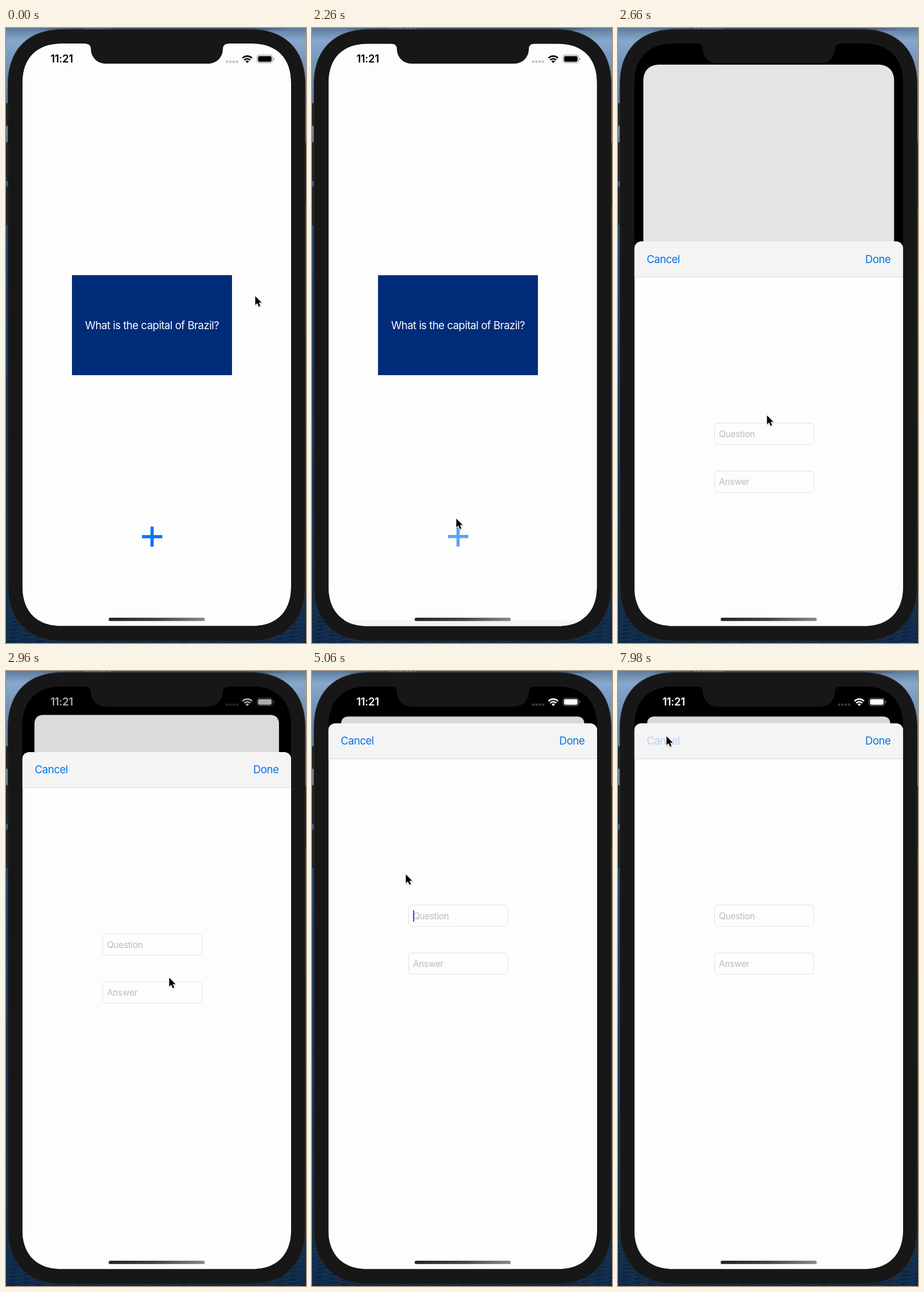
These frames come from a looping animation (523x1070 px, 8000 ms). An HTML page:

```html
<!DOCTYPE html>
<html lang="en">
<head>
<meta charset="utf-8">
<title>Flashcards</title>
<style>
  html, body { margin: 0; width: 100%; height: 100%; overflow: hidden; background: #171717; }
  svg { display: block; width: 100%; height: 100%; }
  text { font: 400 18.6px Inter, Roboto, sans-serif; letter-spacing: -.028em; }
  .clock { font-weight: 600; letter-spacing: -.02em; }
  .hint { font-size: 15.4px; letter-spacing: -.02em; fill: #bcbcc0; }
  .link { fill: #0073ea; }
  .label { font-size: 12px; letter-spacing: 0; }
</style>
</head>
<body>
<svg viewBox="0 0 523 1070" preserveAspectRatio="none">
  <defs>
    <linearGradient id="desk" x2="0" y2="1">
      <stop offset="0" stop-color="#5f7b9c"/>
      <stop offset=".02" stop-color="#86a8cc"/>
      <stop offset=".11" stop-color="#5d7c9f"/>
      <stop offset=".17" stop-color="#74838f"/>
      <stop offset=".25" stop-color="#3a6088"/>
      <stop offset=".34" stop-color="#1c4468"/>
      <stop offset="1" stop-color="#0c2542"/>
    </linearGradient>
    <linearGradient id="topEdge">
      <stop offset=".1" stop-color="#3d4b60" stop-opacity="0"/>
      <stop offset=".25" stop-color="#3d4b60"/>
      <stop offset=".8" stop-color="#3d4b60"/>
      <stop offset=".95" stop-color="#3d4b60" stop-opacity="0"/>
    </linearGradient>
    <linearGradient id="bar">
      <stop offset="0" stop-color="#232323"/>
      <stop offset=".5" stop-color="#444"/>
      <stop offset="1" stop-color="#8a8a8a"/>
    </linearGradient>
    <pattern id="waves" width="23" height="7" patternUnits="userSpaceOnUse" patternTransform="rotate(8)">
      <path d="M0 2q6-2 12 0t11 0M3 5q5 2 13 0" fill="none" stroke="#3f6f9c" stroke-opacity=".35"/>
    </pattern>
    <clipPath id="screenClip"><path id="screenShape"/></clipPath>
  </defs>

  <rect width="523" height="1070" fill="url(#desk)"/>
  <rect y="360" width="523" height="710" fill="url(#waves)"/>
  <rect width="523" height="4" fill="url(#topEdge)"/>
  <text class="label" x="158" y="3" text-anchor="middle" fill="#8995a5">Receipts</text>

  <g fill="#20221f" stroke="#38393a" stroke-width=".7">
    <rect x="-3" y="131" width="8" height="39"/>
    <rect x="-3" y="199" width="8" height="67"/>
    <rect x="-3" y="276" width="8" height="67"/>
    <rect x="519" y="200" width="7" height="110"/>
  </g>
  <path id="body" fill="#171717" stroke="#2d2e2e"/>

  <g clip-path="url(#screenClip)">
    <rect x="28" y="26" width="470" height="1016"/>
    <g id="home">
      <path id="homeShape" fill="#fdfdfc"/>
      <rect x="115" y="430" width="279" height="174" fill="#002c7a"/>
      <text x="254.5" y="524" text-anchor="middle" fill="#fff">What is the capital of Brazil?</text>
      <path id="plus" d="M254.7 867.5V902.5M237 885H272.5" stroke="#0a72ff" stroke-width="5.6"/>
      <path id="dim"/>
    </g>
    <g id="sheet">
      <rect x="28.5" width="468.5" height="1100" rx="12" fill="#fdfdfc"/>
      <path d="M28.5 61V12a12 12 0 0 1 12-12H485a12 12 0 0 1 12 12V61z" fill="#f4f4f5"/>
      <path d="M28.5 61.5H497" stroke="#d6d6d9"/>
      <text id="cancel" class="link" x="50" y="37">Cancel</text>
      <text class="link" x="475.3" y="37" text-anchor="end">Done</text>
      <g fill="#fdfdfd" stroke="#e2e2e6">
        <rect x="168.5" y="316" width="173" height="37" rx="5.5"/>
        <rect x="168.5" y="399.4" width="173" height="37" rx="5.5"/>
      </g>
      <text class="hint" x="176" y="340.4">Question</text>
      <text class="hint" x="176" y="423.8">Answer</text>
      <rect id="caret" x="176" y="325" width="2.3" height="20" rx="1" fill="#3d5fe0"/>
    </g>
    <g id="status">
      <text class="clock" x="97" y="60.4" text-anchor="middle">11:21</text>
      <g id="dots" opacity=".23"></g>
      <g fill="none" stroke="currentColor" stroke-width="2.7">
        <path d="M412.3 52.4a11.7 11.7 0 0 1 16.6 0"/>
        <path d="M415.4 55.7a7.2 7.2 0 0 1 10.4 0"/>
      </g>
      <path d="M420.6 61l-3-3a4.3 4.3 0 0 1 6 0z"/>
      <rect x="437.7" y="47.4" width="27" height="13" rx="3.8" fill="none" stroke="currentColor" stroke-opacity=".4" stroke-width="1.1"/>
      <rect x="439.4" y="49.1" width="23.6" height="9.6" rx="2.4"/>
      <path d="M466 51.6q1.8.8 1.8 2.3t-1.8 2.3z" opacity=".45"/>
    </g>
    <rect x="179" y="1026" width="167.5" height="5.8" rx="2.9" fill="url(#bar)"/>
  </g>
  <path d="M139 25V27.5q9 0 9 9.5a25 25 0 0 0 25 25H353a25 25 0 0 0 25-25q0-9.5 9-9.5V25z" fill="#171717"/>

  <g id="cursor" stroke-linejoin="round">
    <path d="M.5 1.5V17L4.1 13.7 6.6 19.6 9.4 18.4 6.9 12.7H11.7z" fill="#000" opacity=".18" stroke="#000" stroke-width="2"/>
    <path d="M0 0V15.6L3.6 12.3 6.1 18.2 8.9 17 6.4 11.3H11.2z" stroke="#fff" stroke-width="2.2" paint-order="stroke"/>
  </g>
</svg>

<script>
const LOOP = 8000;
const PLUS_DOWN = 2060, PLUS_UP = 2160;
const FIELD_TAP = 4000, CANCEL_DOWN = 7900;

const SCREEN = { x: 28.5, y: 27, w: 468.5, h: 1013.5 };
const SHEET_HIDDEN = 1040, SHEET_OPEN = 90;

// [time, x, y] of the pointer tip
const POINTER = [
  [0, 434.5, 466.5], [300, 434.5, 466.5], [1750, 254, 882], [2160, 254, 880],
  [2260, 251.5, 853.5], [2500, 250, 729], [2960, 284.5, 533.5], [3600, 182.5, 432.5],
  [4300, 182.5, 432.5], [5700, 149, 293], [6700, 149, 293], [7750, 84.5, 113.5]
];
// [time, phase] of the spring that lifts the sheet
const SPRING = [[2230, 0], [2260, .145], [2500, 1.28], [2960, 4.64], [3400, 9]];

const $ = id => document.getElementById(id);
const clamp = v => Math.min(1, Math.max(0, v));
const lerp = (a, b, k) => a + (b - a) * k;
const ramp = (t, from, to) => clamp((t - from) / (to - from));
const smooth = k => k * k * (3 - 2 * k);
const linear = k => k;

function track(keys, t, ease) {
  if (t <= keys[0][0]) return keys[0].slice(1);
  const next = keys.findIndex(key => key[0] > t);
  if (next < 0) return keys[keys.length - 1].slice(1);
  const a = keys[next - 1], b = keys[next];
  const k = ease(ramp(t, a[0], b[0]));
  return a.slice(1).map((v, i) => lerp(v, b[i + 1], k));
}

// Rectangle with continuous corners that reach `e` along each side
function squircle({ x, y, w, h }, e) {
  const c = e * .37, r = x + w, b = y + h;
  return `M${x} ${y + e}C${x} ${y + c} ${x + c} ${y} ${x + e} ${y}H${r - e}` +
    `C${r - c} ${y} ${r} ${y + c} ${r} ${y + e}V${b - e}` +
    `C${r} ${b - c} ${r - c} ${b} ${r - e} ${b}H${x + e}` +
    `C${x + c} ${b} ${x} ${b - c} ${x} ${b - e}Z`;
}

function build() {
  $('body').setAttribute('d', squircle({ x: 3.5, y: 2.5, w: 518, h: 1064 }, 95));
  $('screenShape').setAttribute('d', squircle(SCREEN, 68));
  $('dots').innerHTML = [0, 1, 2, 3].map(i =>
    `<rect x="${383.3 + i * 5.8}" y="56.6" width="4.1" height="4.1" rx="1.4"/>`).join('');
}

function drawHome(lift) {
  const cx = SCREEN.x + SCREEN.w / 2, cy = SCREEN.y + SCREEN.h / 2;
  const scale = 1 - .0953 * lift;
  $('home').setAttribute('transform',
    `translate(${cx} ${cy + 4 * lift}) scale(${scale}) translate(${-cx} ${-cy})`);
  const shape = squircle(SCREEN, lerp(68, 14, lift));
  $('homeShape').setAttribute('d', shape);
  $('dim').setAttribute('d', shape);
  $('dim').setAttribute('opacity', .14 * lift);
}

function draw(t) {
  const [phase] = track(SPRING, t, linear);
  const lift = 1 - (1 + phase) * Math.exp(-phase);
  drawHome(lift);
  $('sheet').setAttribute('transform', `translate(0 ${lerp(SHEET_HIDDEN, SHEET_OPEN, lift)})`);
  $('sheet').setAttribute('visibility', phase > 0 ? 'visible' : 'hidden');

  const grey = Math.round(255 * ramp(t, 2770, 3055));
  $('status').setAttribute('fill', `rgb(${grey},${grey},${grey})`);
  $('status').setAttribute('color', `rgb(${grey},${grey},${grey})`);

  const pressed = t >= PLUS_DOWN && t < PLUS_UP;
  const plusAlpha = t < PLUS_DOWN ? 1 : pressed ? .2 : lerp(.2, 1, ramp(t, PLUS_UP, PLUS_UP + 178));
  $('plus').setAttribute('opacity', plusAlpha);
  $('cancel').setAttribute('opacity', t >= CANCEL_DOWN ? .25 : 1);

  const blink = (t - FIELD_TAP) % 1000;
  $('caret').setAttribute('opacity', t < FIELD_TAP ? 0 : 1 - ramp(blink, 500, 600) + ramp(blink, 990, 1000));

  const [x, y] = track(POINTER, t, smooth);
  $('cursor').setAttribute('transform', `translate(${x} ${y})`);
}

build();
const start = performance.now();
function tick() {
  draw((performance.now() - start) % LOOP);
  requestAnimationFrame(tick);
}
tick();
</script>
</body>
</html>
```
